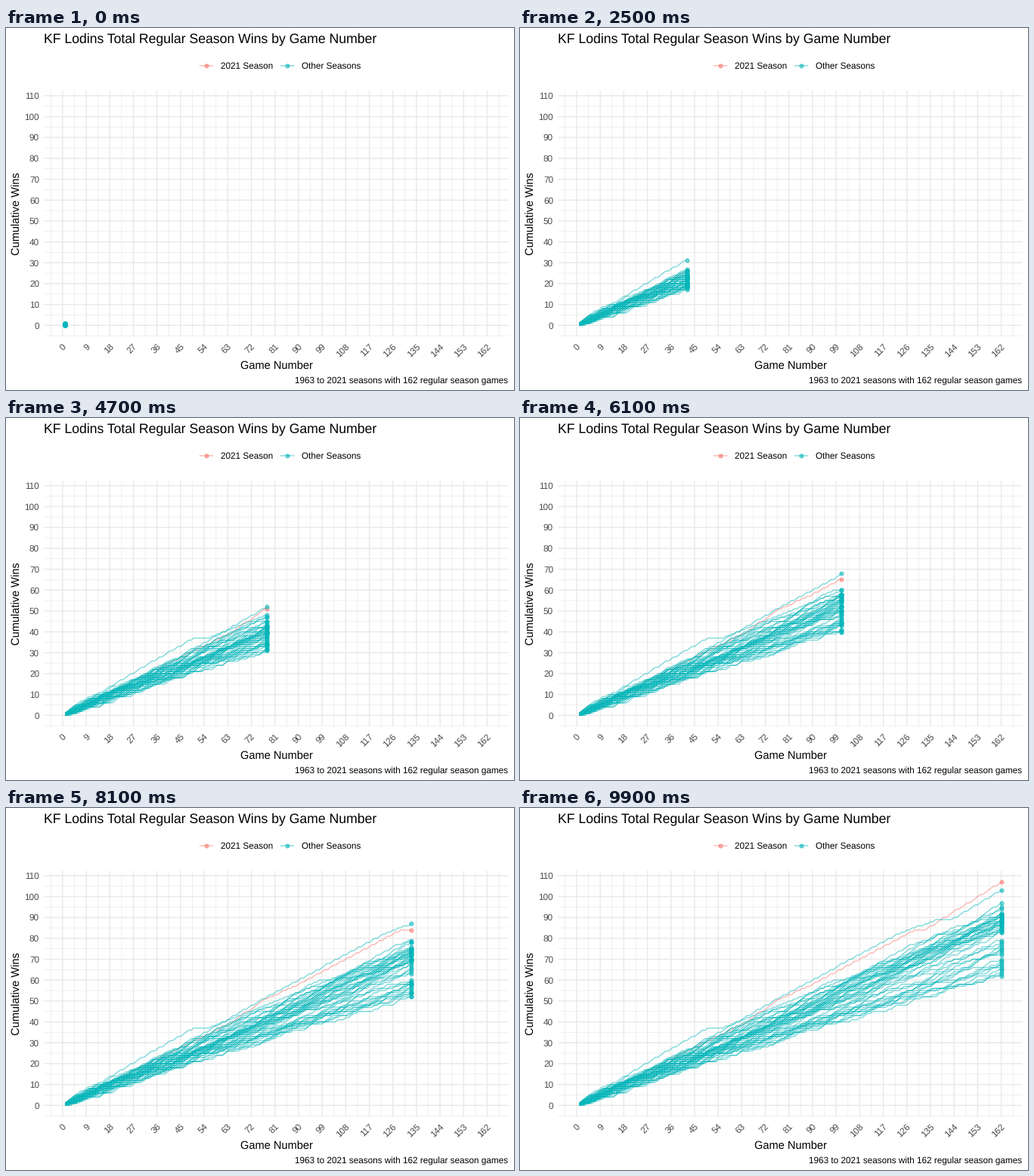
Write a matplotlib script that moves like this. It is 672 by 480 pixels and loops after 10 s.

```python
import random

import matplotlib.pyplot as plt
import numpy as np
from matplotlib.animation import FuncAnimation
from matplotlib.collections import LineCollection

W, H, DPI = 672, 480, 96
FRAMES, GAMES = 100, 162
RED, TEAL = "#F8766D", "#06B6BA"
GRID, GREY = "#E9E9E9", "#4D4D4D"
LINE_ALPHA, DOT_ALPHA = 0.5, 0.58
LEFT, RIGHT, TOP, BOTTOM = 50.5, 664.5, 83.3, 409.1
PT = 72 / DPI  # points per pixel

plt.rcParams.update({"font.family": "Liberation Sans", "text.hinting": "none"})
rng = random.Random(21)
game = np.arange(1, GAMES + 1)


def gx(g):
    return LEFT + (g + 7.05) * (RIGHT - LEFT) / 177.1


def wy(wins):
    return BOTTOM - (wins + 5.35) * (BOTTOM - TOP) / 117.7


# ---- season data -------------------------------------------------------

def paced(*knots):
    """Wins that rise steadily between (game, wins) knots."""
    g, w = zip((0, 0), *knots)
    return np.floor(np.interp(game, g, w) + 0.5)


def shuffled(total):
    """Random order of wins and losses that stays in the usual corridor."""
    results = [1] * total + [0] * (GAMES - total)
    while True:
        rng.shuffle(results)
        wins = np.cumsum(results)
        if all(wins <= 0.575 * game + 4) and all(wins >= 0.39 * game - 1.5):
            return wins


best = paced((26, 16), (65, 40), (76, 50), (90, 58), (129, 84), (133, 84),
             (162, 107))
runner_up = paced((42, 26), (78, 52), (124, 83), (138, 89), (143, 89),
                  (162, 103))
fast_start = paced((36, 27), (50, 37), (55, 37), (162, 90))

weak, strong = np.linspace(62, 79, 17), np.linspace(83, 92, 25)
totals = [round(t) for t in (*weak, *strong, 94, 95, 97)]
rng.shuffle(totals)

wins = [best, runner_up, fast_start] + [shuffled(t) for t in totals]
paths = [np.column_stack([gx(game), wy(w)]) for w in wins]
colors = [RED] + [TEAL] * (len(paths) - 1)

# ---- static parts ------------------------------------------------------

fig = plt.figure(figsize=(W / DPI, H / DPI), dpi=DPI, facecolor="white")
ax = fig.add_axes([0, 0, 1, 1])
ax.set(xlim=(0, W), ylim=(H, 0))
ax.axis("off")


def text(x, y, s, size=8.8, color="black", ha="left", rot=0):
    ax.text(x, y, s, fontsize=size, color=color, ha=ha, va="baseline",
            rotation=rot, rotation_mode="anchor")


def grid(games, scores, width):
    segs = [[(gx(g), TOP), (gx(g), BOTTOM)] for g in games]
    segs += [[(LEFT, wy(s)), (RIGHT, wy(s))] for s in scores]
    lines = LineCollection(segs, colors=GRID, linewidths=width * PT, zorder=1)
    lines.set_snap(False)
    ax.add_collection(lines)


def dots(color):
    return ax.plot([], [], "o", color=color, alpha=DOT_ALPHA, ms=5.2 * PT,
                   mew=0.945 * PT, zorder=4)[0]


def legend_key(x, color, label):
    ax.plot([x - 9.2, x + 9.2], [50, 50], color=color, alpha=LINE_ALPHA,
            lw=1.42 * PT, solid_capstyle="butt", snap=False)
    dots(color).set_data([x], [50])
    text(x + 18.8, 54, label)


grid(np.arange(-4.5, 170, 9), range(-5, 110, 10), 0.71)
grid(range(0, 163, 9), range(0, 111, 10), 1.42)
for g in range(0, 163, 9):
    text(gx(g) + 5.5, 422.9, str(g), color=GREY, ha="right", rot=45)
for s in range(0, 111, 10):
    text(44, wy(s) + 4.2, str(s), color=GREY, ha="right")

text(LEFT, 19.5, "KF Lodins Total Regular Season Wins by Game Number", 13.2)
text(358, 452.5, "Game Number", 11, ha="center")
text(18.5, 246.5, "Cumulative Wins", 11, ha="center", rot=90)
text(RIGHT, 471.5, "1963 to 2021 seasons with 162 regular season games",
     ha="right")
legend_key(265, RED, "2021 Season")
legend_key(372, TEAL, "Other Seasons")

# ---- moving parts ------------------------------------------------------

curves = LineCollection([], colors=colors, linewidths=1.42 * PT,
                        alpha=LINE_ALPHA, zorder=3)
ax.add_collection(curves)
red_dot, teal_dots = dots(RED), dots(TEAL)


def update(i):
    n = int(1 + (GAMES - 1) * (i + 0.5) / (FRAMES - 1))
    curves.set_segments([p[:n] for p in paths])
    ends = np.array([p[n - 1] for p in paths])
    red_dot.set_data(ends[:1].T)
    teal_dots.set_data(ends[1:].T)
    return curves, red_dot, teal_dots


anim = FuncAnimation(fig, update, frames=FRAMES, interval=100, repeat=True,
                     repeat_delay=0, cache_frame_data=False)
plt.show()
```
